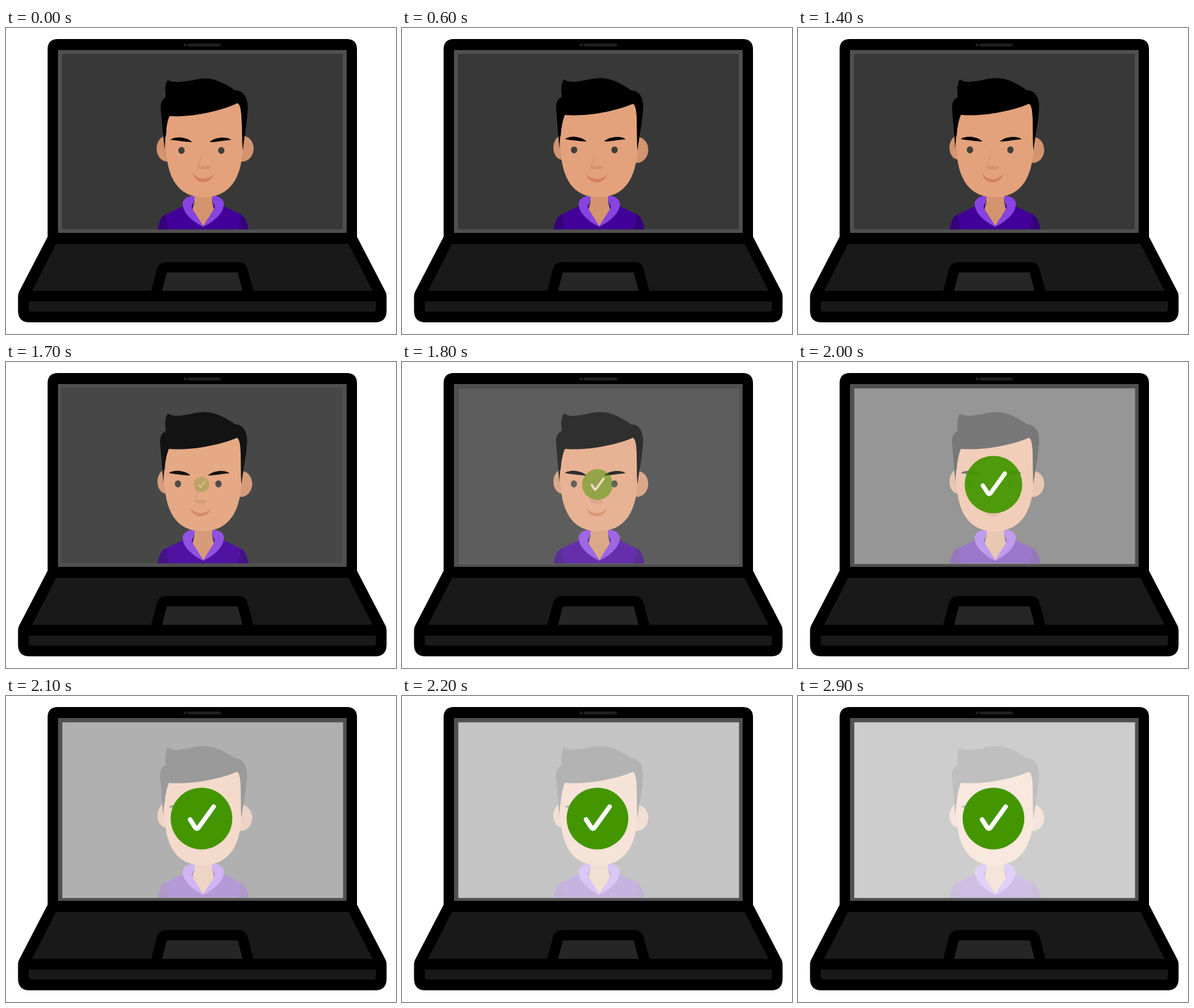
Animation, 600 px wide and 472 px high, one loop 3000 ms. Source, as an HTML page:

```html
<!DOCTYPE html>
<html lang="en">
<head>
<meta charset="utf-8">
<title>Face check on a laptop</title>
<style>
  html, body { margin: 0; width: 100%; height: 100%; overflow: hidden; background: #fff; }
  svg { display: block; width: 600px; height: 472px; }
</style>
</head>
<body>
<svg viewBox="0 0 600 472">
  <!-- laptop -->
  <path d="M64 33Q64 17 80 17H524Q540 17 540 33V322L584 407Q585.500 410 585.500 414V436Q585.500 454 567.500 454H36.500Q18.500 454 18.500 436V414Q18.500 410 20 407L64 322Z"/>
  <path fill="#191919" d="M77 333H527L564 405.500H40Z"/>
  <path fill="#191919" d="M35 422H569V433.500Q569 437.500 565 437.500H39Q35 437.500 35 433.500Z"/>
  <path d="M223 407L232 373Q235 361 247 361H357Q369 361 372 373L381 407Z"/>
  <path fill="#262626" d="M247.500 377H356.500L364 405.500H240Z"/>
  <circle cx="275.500" cy="26.200" r="2.400" fill="#202020"/>
  <rect x="279" y="24" width="52" height="4.500" rx="2.200" fill="#202020"/>
  <rect x="80" y="34" width="444" height="282" fill="#505050"/>
  <rect x="86" y="40" width="432" height="270.500" fill="#383838"/>

  <!-- body -->
  <path fill="#420099" d="M233.500 310.500C236 297 238 291 247 287L276 273H331L360 287C368 291 370 297 373 310.500Z"/>
  <path fill="#35007a" d="M233.500 310.500C236 297 238 291 247 287C246 295 248 303 251 310.500ZM373 310.500C370 297 368 291 360 287C361 295 359 303 356 310.500Z"/>
  <path fill="#d3946f" d="M290 250H317V268L320 280L303.500 306L287 280L290 268Z"/>
  <path id="collar" fill="#8844e0" d="M290 258.500C277 259 270 266 272 274C274 288 290 300 303.500 306.500C298 295 290 286 287 280C283 272 290 271 290 265Z"/>
  <use href="#collar" transform="matrix(-1 0 0 1 607 0)"/>

  <!-- head -->
  <g fill="#d3946f">
    <ellipse id="earL"/>
    <ellipse id="earR"/>
  </g>
  <path id="face" fill="#e3a27c"/>
  <path id="hair"/>
  <g id="brows">
    <path d="M250.500 171.500C256 166 274 166 283.500 174.500C283 176 272 174 250.500 171.500Z"/>
    <path d="M344 171.500C337 166 320 167 311 174.500C312 176 322 174 344 171.500Z"/>
  </g>
  <g fill="#403f38">
    <ellipse id="eyeL" rx="4.900" ry="5.400"/>
    <ellipse id="eyeR" rx="4.900" ry="5.400"/>
  </g>
  <g id="nose" fill="#d3946f">
    <path d="M297.300 183C297 196 294 207 291 215L289 215C293 205 296 195 297.300 183Z"/>
    <ellipse cx="299.500" cy="215.200" rx="10.200" ry="3"/>
  </g>
  <path id="mouth" fill="#d3815c" d="M283 224C287 243 312 243 316 224C309 236 291 236 283 224Z"/>

  <!-- confirmation -->
  <rect id="veil" x="86.500" y="40.500" width="432" height="271" fill="#fff"/>
  <g id="badge">
    <circle r="47.500" fill="#439600"/>
    <path d="M-17.500 1.500L-9.500 14Q-7 17.500 -4.500 14L18.700 -18.200" fill="none" stroke="#fff" stroke-width="7" stroke-linecap="round" stroke-linejoin="round"/>
  </g>
</svg>
<script>
  const LOOP = 3000, STEP = 100;
  const el = id => document.getElementById(id);
  const set = (id, attrs) => {
    for (const name in attrs) el(id).setAttribute(name, attrs[name]);
  };
  const shift = (id, x, y) => set(id, { transform: `translate(${x} ${y})` });

  // Cosine ease from 0 to 1 between two times.
  function ease(t, start, end) {
    const p = Math.min(1, Math.max(0, (t - start) / (end - start)));
    return (1 - Math.cos(Math.PI * p)) / 2;
  }

  // k = 1: turned to the right, k = 0: turned to the left
  function poseHead(k) {
    set('earL', { cx: 246 + 2 * k, cy: 184.5 + 1.5 * k, rx: 13 + 3.3 * k, ry: 18.5 + 1.5 * k });
    set('earR', { cx: 361.5 + 1.5 * k, cy: 188 - 2 * k, rx: 17.3 + .7 * k, ry: 20 });
    set('face', { d: `M${243.5 + 2.5 * k} 178C${244 + 2.5 * k} 235 ${265 + 2 * k} 261 ${302 + 2 * k} 261
      C${340 + 2 * k} 261 ${362 + 2 * k} 235 ${362.5 + 2 * k} 178L${360 + k} 112H${248 + k}Z` });
    set('hair', { d: `M${242 + 2 * k} ${186 + 2 * k}L${237 + k} 124C${237 + k} 113 ${240 + k} 110 246 106
      C244 95 245 85 249 ${79.3 + k}C257 85 270 83 285 ${80 + k}
      C300 ${76.5 + k / 2} 312 76 325 ${81 + k / 2}C337 86 344 90 352 96
      C365 96 ${371 + k} 107 ${371 + k} 122C${370 + k} 145 ${365 + 2 * k} 165 ${362.3 + 2 * k} 189
      C${360 + 2 * k} 160 ${364 + k} 119 ${355 + k} ${117 - k}
      C${330 + k} 128 ${285 + k} ${137 + k} ${250.5 + k} ${134 + 2 * k}
      C${246 + k} 145 ${243 + 2 * k} 165 ${242 + 2 * k} ${186 + 2 * k}Z` });
    shift('brows', 2.5 * k, k);
    set('eyeL', { cx: 264.5 + 5.5 * k, cy: 188 + .8 * k });
    set('eyeR', { cx: 326.8 + 4.4 * k, cy: 188 + .8 * k });
    shift('nose', 5.5 * k, 0);
    shift('mouth', 4 * k, -.5 * k);
  }

  function draw(t) {
    poseHead(1 - ease(t, 0, 700));
    set('veil', { opacity: .75 * ease(t, 1540, 2330) });
    const shown = ease(t, 1500, 2100);
    set('badge', { opacity: shown, transform: `translate(300.700 189) scale(${shown})` });
  }

  const begin = performance.now();
  function frame() {
    const t = (performance.now() - begin) % LOOP;
    draw(Math.floor(t / STEP) * STEP);
    requestAnimationFrame(frame);
  }
  frame();
</script>
</body>
</html>
```
